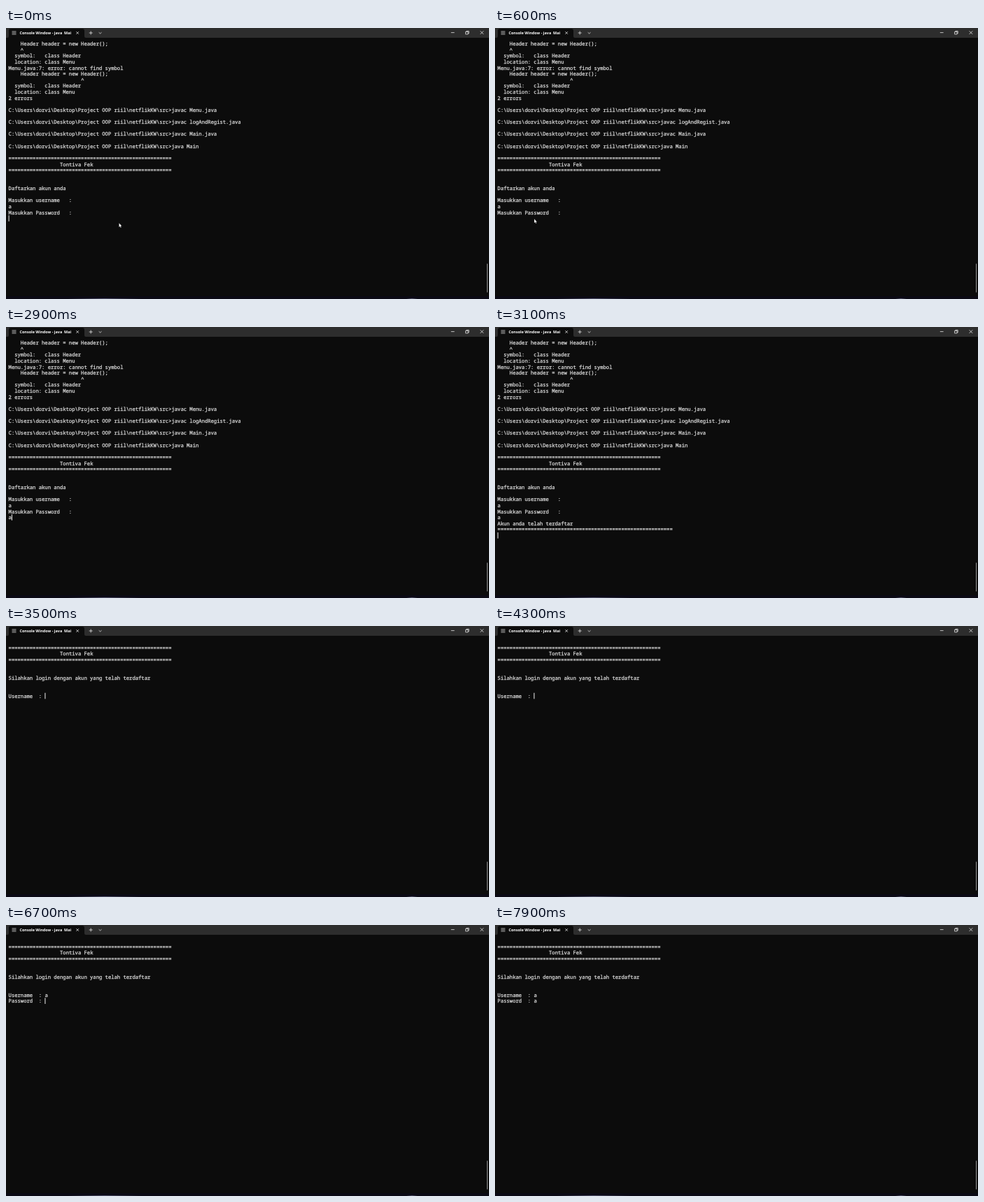
An HTML page for the animation above (8000 ms loop, 690 by 388 pixels).

```html
<!DOCTYPE html>
<html lang="id">
<head>
<meta charset="utf-8">
<title>Terminal</title>
<style>
  html, body { margin: 0; width: 100%; height: 100%; overflow: hidden; background: #0c0c0c; }
  svg { display: block; width: 690px; height: 388px; }
  text { white-space: pre; text-rendering: geometricPrecision; }
  .term { font: 500 7.2px "Noto Sans Mono", "DejaVu Sans Mono", monospace; fill: #d4d4d4; stroke: #d4d4d4; stroke-width: .28; }
  .title { font: 700 5.46px "Open Sans", "Noto Sans", sans-serif; fill: #fff; }
  .icon { fill: none; stroke: #e6e6e6; stroke-width: .8; }
</style>
</head>
<body>
<svg viewBox="0 0 690 388">
  <defs>
    <linearGradient id="glow">
      <stop offset="0" stop-color="#50516a" stop-opacity="0"/>
      <stop offset=".5" stop-color="#50516a"/>
      <stop offset="1" stop-color="#50516a" stop-opacity="0"/>
    </linearGradient>
  </defs>
  <rect width="690" height="388" fill="#0c0c0c"/>

  <rect width="690" height="14" fill="#2d2d2d"/>
  <path d="M2 14Q4 14 4 12V4Q4 1 7 1H109Q112 1 112 4V12Q112 14 114 14Z" fill="#0c0c0c"/>
  <rect x="8.5" y="4" width="6" height="6" fill="#5c5c5c"/>
  <text class="title" x="19.5" y="9.2">Console Window - java  Mai</text>
  <path class="icon" d="M100.4 5.2l3.6 3.6m0-3.6l-3.6 3.6M118.7 7h5M121.2 4.5v5M132.7 6.3l1.9 1.7 1.9-1.7
    M635.8 6.6h4.8M677.6 4.3l4.6 4.6m0-4.6l-4.6 4.6M656.6 5.4h3.5v3.5h-3.5zM657.8 5.3V4.4h3.4v3.4h-1"/>

  <g id="register" class="term"></g>
  <g id="login" class="term"></g>
  <rect id="caret" width="1" height="8.625" fill="#f0f0f0"/>
  <path id="mouse" d="M0 0V6L1.4 4.8 2.3 6.8 3.3 6.3 2.4 4.4H4.2Z" fill="#fff" stroke="#111" stroke-width=".3"/>

  <rect x="687" y="337.5" width="1" height="41" fill="#9c9c9c"/>
  <rect y="384" width="690" height="4" fill="#0b0a15"/>
  <rect x="88" y="387" width="106" height="1" fill="url(#glow)"/>
  <rect x="572" y="387" width="16" height="1" fill="url(#glow)"/>
</svg>
<script>
const LOOP = 8000, CELL = 4.32, ROW = 8.625, LEFT = 3.59, TOP = 18.1;
const $ = id => document.getElementById(id);
const cellX = col => LEFT + col * CELL;
const rowY = row => TOP + row * ROW;

// Adds one line of terminal text; it is visible from time `from` on.
const timed = [];
function put(screen, row, col, str, from = 0) {
  const t = document.createElementNS("http://www.w3.org/2000/svg", "text");
  t.setAttribute("x", cellX(col));
  t.setAttribute("y", rowY(row) + 6.9);
  t.textContent = str;
  $(screen).append(t);
  if (from) timed.push({ t, from });
}

function banner(screen, row) {
  put(screen, row, 0, "=".repeat(54));
  put(screen, row + 1, 17, "Tontiva Fek");
  put(screen, row + 2, 0, "=".repeat(54));
}

const OUTPUT = 3000, SWITCH = 3500;

put("register", 4, 0, "Menu.java:7: error: cannot find symbol");
[[0, 4], [5, 24]].forEach(([row, mark]) => {
  put("register", row, 4, "Header header = new Header();");
  put("register", row + 1, mark, "^");
  put("register", row + 2, 2, "symbol:   class Header");
  put("register", row + 3, 2, "location: class Menu");
});
put("register", 9, 0, "2 errors");
["javac Menu.java", "javac logAndRegist.java", "javac Main.java", "java Main"].forEach((cmd, i) =>
  put("register", 11 + 2 * i, 0, "C:\\Users\\dorvi\\Desktop\\Project OOP riil\\netflikKW\\src>" + cmd));
banner("register", 19);
put("register", 24, 0, "Daftarkan akun anda");
put("register", 26, 0, "Masukkan username   :");
put("register", 27, 0, "a");
put("register", 28, 0, "Masukkan Password   :");
put("register", 29, 0, "a", 1600);
put("register", 30, 0, "Akun anda telah terdaftar", OUTPUT);
put("register", 31, 0, "=".repeat(58), OUTPUT);

banner("login", 1);
put("login", 6, 0, "Silahkan login dengan akun yang telah terdaftar");
put("login", 9, 0, "Username  :");
put("login", 9, 12, "a", 5300);
put("login", 10, 0, "Password  :", 6700);
put("login", 10, 12, "a", 7300);

// time, row, column, lit
const caretSteps = [
  [0, 29, 0, 1], [300, 29, 0, 0], [800, 29, 0, 1], [1300, 29, 0, 0],
  [1600, 29, 1, 1], [2400, 29, 1, 0], [2900, 29, 1, 1], [OUTPUT, 32, 0, 1],
  [SWITCH, 9, 12, 1], [3700, 9, 12, 0], [4300, 9, 12, 1], [4800, 9, 12, 0],
  [5300, 9, 13, 1], [6000, 9, 13, 0], [6500, 9, 13, 1],
  [6700, 10, 12, 1], [7300, 10, 13, 1], [7900, 10, 13, 0]
];

const show = (el, on) => el.setAttribute("visibility", on ? "visible" : "hidden");
const bend = (a, b, c, u) => a * (1 - u) ** 2 + 2 * b * u * (1 - u) + c * u * u;

function draw(time) {
  show($("register"), time < SWITCH);
  show($("login"), time >= SWITCH);
  for (const { t, from } of timed) {
    t.setAttribute("display", time >= from ? "inline" : "none");
  }

  const [, row, col, lit] = caretSteps.findLast(s => s[0] <= time);
  $("caret").setAttribute("x", cellX(col));
  $("caret").setAttribute("y", rowY(row));
  show($("caret"), lit);

  const u = Math.min(6, Math.floor(time / 100)) / 6;
  $("mouse").setAttribute("transform",
    `translate(${bend(161.4, 96, 56, u)} ${bend(279.2, 363, 273.3, u)})`);
  show($("mouse"), time < 1600);
}

const start = performance.now();
function tick() {
  draw((performance.now() - start) % LOOP);
  requestAnimationFrame(tick);
}
tick();
</script>
</body>
</html>
```
